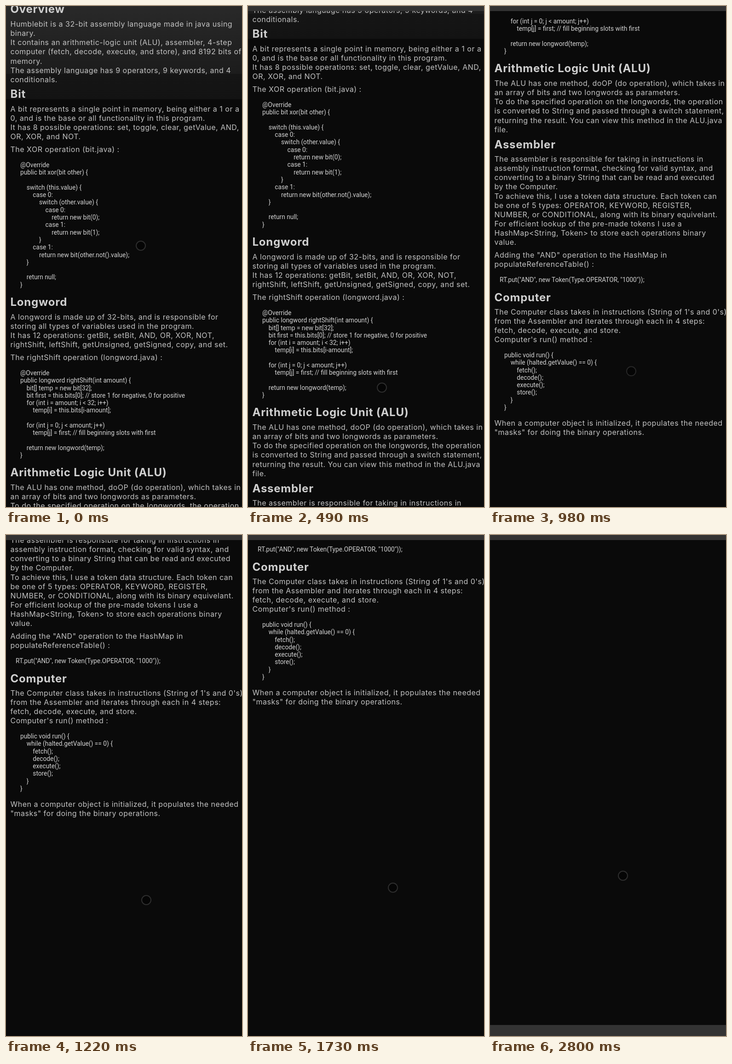
An HTML page for the animation above (2820 ms loop, 513x1091 px).

```html
<!DOCTYPE html>
<html lang="en">
<head>
<meta charset="utf-8">
<style>
html, body { margin: 0; width: 100%; height: 100%; overflow: hidden; background: #0a0a0a; }
#stage { position: relative; width: 513px; height: 1091px; overflow: hidden; }
#stage > *, #page > * { position: absolute; margin: 0; }
#page { top: 0; left: 0; width: 513px; height: 3200px; }
#fade {
  width: 513px; height: 203px;
  background: linear-gradient(#292929, #1c1c1c 148px, #151515 148px, #131313 203px);
}
#page pre, h2 { left: 9.5px; white-space: pre; font-optical-sizing: none; }
#page pre { font: 16px/20.15px Inter, sans-serif; letter-spacing: .5px; color: #c3c3c3; }
#page h2 { font: 700 24px/30px Inter, sans-serif; letter-spacing: .75px; color: #d0d0d0; }
#page pre.code { left: 31px; font: 13.75px/16.3px Roboto, sans-serif; letter-spacing: 0; color: #d4d4d4; }
#footer { width: 513px; height: 200px; background: #333; }
#bar { top: 0; left: 0; width: 513px; height: 11px; background: #333; }
#touch {
  left: -11px; top: -11px; width: 22px; height: 22px; box-sizing: border-box;
  border: 2px solid #2e2e2e; border-radius: 50%; background: #050505;
}
</style>
</head>
<body>
<div id="stage">
<div id="touch"></div>
<div id="page">
<h2 style="top:-8px">Overview</h2>
<pre style="top:29px">Humblebit is a 32-bit assembly language made in java using
binary.
It contains an arithmetic-logic unit (ALU), assembler, 4-step
computer (fetch, decode, execute, and store), and 8192 bits of
memory.
The assembly language has 9 operators, 9 keywords, and 4
conditionals.</pre>
<h2 style="top:177px">Bit</h2>
<pre style="top:214px">A bit represents a single point in memory, being either a 1 or a
0, and is the base or all functionality in this program.
It has 8 possible operations: set, toggle, clear, getValue, AND,
OR, XOR, and NOT.</pre>
<pre style="top:302px">The XOR operation (bit.java) :</pre>
<pre class="code" style="top:338px">@Override
public bit xor(bit other) {

    switch (this.value) {
        case 0:
            switch (other.value) {
                case 0:
                    return new bit(0);
                case 1:
                    return new bit(1);
            }
        case 1:
            return new bit(other.not().value);
    }

    return null;
}</pre>
<h2 style="top:630px">Longword</h2>
<pre style="top:667px">A longword is made up of 32-bits, and is responsible for
storing all types of variables used in the program.
It has 12 operations: getBit, setBit, AND, OR, XOR, NOT,
rightShift, leftShift, getUnsigned, getSigned, copy, and set.</pre>
<pre style="top:755px">The rightShift operation (longword.java) :</pre>
<pre class="code" style="top:791px">@Override
public longword rightShift(int amount) {
    bit[] temp = new bit[32];
    bit first = this.bits[0]; // store 1 for negative, 0 for positive
    for (int i = amount; i &lt; 32; i++)
        temp[i] = this.bits[i-amount];

    for (int j = 0; j &lt; amount; j++)
        temp[j] = first; // fill beginning slots with first

    return new longword(temp);
}</pre>
<h2 style="top:1001px">Arithmetic Logic Unit (ALU)</h2>
<pre style="top:1038px">The ALU has one method, doOP (do operation), which takes in
an array of bits and two longwords as parameters.
To do the specified operation on the longwords, the operation
is converted to String and passed through a switch statement,
returning the result. You can view this method in the ALU.java
file.</pre>
<h2 style="top:1167px">Assembler</h2>
<pre style="top:1203px">The assembler is responsible for taking in instructions in
assembly instruction format, checking for valid syntax, and
converting to a binary String that can be read and executed
by the Computer.
To achieve this, I use a token data structure. Each token can
be one of 5 types: OPERATOR, KEYWORD, REGISTER,
NUMBER, or CONDITIONAL, along with its binary equivelant.
For efficient lookup of the pre-made tokens I use a
HashMap&lt;String, Token&gt; to store each operations binary
value.</pre>
<pre style="top:1412px">Adding the "AND" operation to the HashMap in
populateReferenceTable() :</pre>
<pre class="code" style="top:1468px;left:21px">RT.put("AND", new Token(Type.OPERATOR, "1000"));</pre>
<h2 style="top:1500px">Computer</h2>
<pre style="top:1536px">The Computer class takes in instructions (String of 1's and 0's)
from the Assembler and iterates through each in 4 steps:
fetch, decode, execute, and store.
Computer's run() method :</pre>
<pre class="code" style="top:1632px">public void run() {
    while (halted.getValue() == 0) {
        fetch();
        decode();
        execute();
        store();
    }
}</pre>
<pre style="top:1778px">When a computer object is initialized, it populates the needed
"masks" for doing the binary operations.</pre>
<div id="footer"></div>
</div>
<div id="bar"></div>
</div>
<script>
const LOOP = 2820, STEP = 61, LEAD = 8, SCROLL_END = 2000;
const [stage, page, touch, bar, footer] =
  ['stage', 'page', 'touch', 'bar', 'footer'].map(id => document.getElementById(id));

// The page tint sits below the touch ring, the text above it.
const fade = document.createElement('div');
fade.id = 'fade';
stage.prepend(fade);
footer.style.top = SCROLL_END + 1067 + 'px';

// [step, scroll offset]
const scrolls = [
  [0, 0], [2, 75], [4, 115], [8, 131.5], [9, 160], [12, 634], [14, 800], [18, 960],
  [20, 1202], [23, 1360], [28, 1445], [32, 1470], [36, 1734], [40, 1900], [46, SCROLL_END]
];
// [step, x, y, opacity]
const touches = [
  [0, 293, 522, 1], [8, 291, 831, 1], [12, 321, 670, .45], [18, 300, 858, 1], [20, 305, 795, 1],
  [22, 318, 690, .8], [28, 315, 768, 1], [31, 312, 807, 1], [36, 327, 636, 1], [46, 289, 742, 1]
];

function sample(keys, step) {
  const next = Math.max(1, keys.findIndex(key => key[0] >= step));
  const from = keys[next - 1], to = keys[next];
  const mix = (step - from[0]) / (to[0] - from[0]);
  return from.slice(1).map((v, i) => v + (to[i + 1] - v) * mix);
}

function draw(now) {
  const step = Math.min(46, Math.floor((now % LOOP + LEAD) / STEP));
  const [offset] = sample(scrolls, step);
  const [x, y, opacity] = sample(touches, step);
  page.style.transform = fade.style.transform = `translateY(${-offset}px)`;
  touch.style.transform = `translate(${x}px, ${y}px)`;
  touch.style.opacity = opacity;
  bar.hidden = step === 0;
  requestAnimationFrame(draw);
}
requestAnimationFrame(draw);
</script>
</body>
</html>
```
